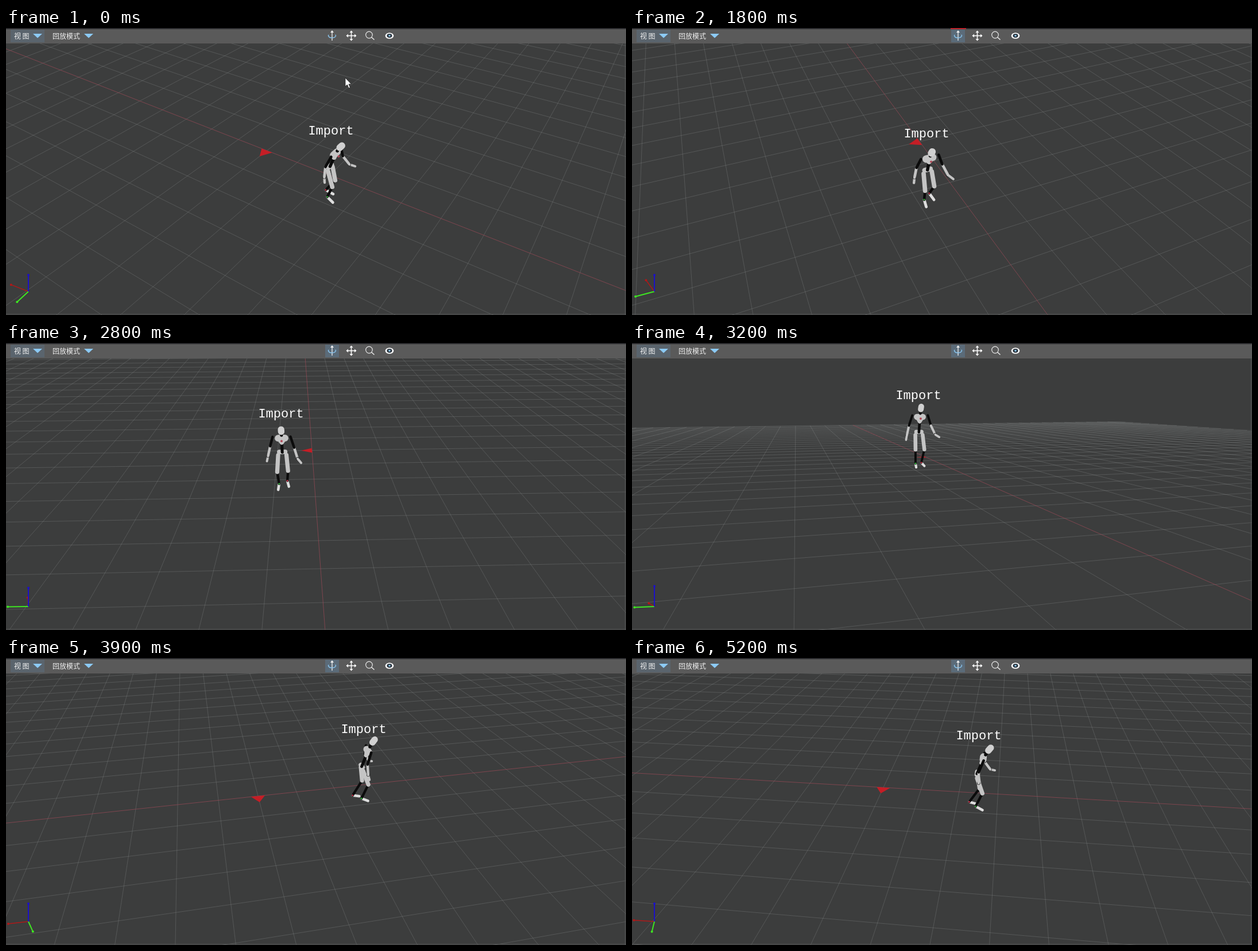
Write an HTML page with a canvas that moves like this. It is 1080x501 px and loops after 5600 ms.

```html
<!DOCTYPE html>
<html lang="zh">
<head>
<meta charset="utf-8">
<style>
html, body { margin: 0; width: 100%; height: 100%; overflow: hidden; background: #3c3d3d; }
canvas { display: block; }
</style>
</head>
<body>
<canvas id="view" width="1080" height="501"></canvas>
<script>
const ctx = document.getElementById('view').getContext('2d');
const LOOP = 5600, STEP = 100;
const FOCAL = 900, CX = 540, CY = 250, NEAR = 0.3, EXTENT = 22;
const LIGHT = '#c4c4c4', DARK = '#0b0b0b', RED = '#c41e26', BLUE = '#8ccaf5';

// time, yaw, pitch, screen x and y of the world origin, depth of the origin
const CAMERA = [
  [0, -56.9, 37, 454.5, 214, 14],
  [1050, -56.9, 37, 454.5, 214, 14],
  [1300, -56.7, 36.2, 454.5, 214, 14],
  [2100, -4.2, 37.2, 529, 189, 14.4],
  [2400, -2.2, 37, 531, 188.5, 14.5],
  [2500, -2.2, 37, 531, 188.5, 14.5],
  [2800, -1.95, 25.7, 533, 187.5, 15.1],
  [3200, -15.6, 9.5, 511, 199, 16.5],
  [3900, -102.6, 30, 439, 241, 13.2],
  [4800, -83.1, 29.9, 438, 226, 13.6],
  [5600, -83.1, 29.9, 438, 226, 13.6]
];

const ROOT = [2.48, -0.78, 0];
// joints: forward, sideways, up
const J = {
  pelvis: [0, 0, 0.95], chest: [0.12, 0, 1.3], neck: [0.18, 0, 1.45],
  headLow: [0.24, 0, 1.56], headTop: [0.29, 0, 1.63],
  shR: [0.15, -0.21, 1.4], elR: [0.05, -0.28, 1.13], wrR: [0.06, -0.34, 0.88], haR: [0.09, -0.37, 0.76],
  shL: [0.15, 0.21, 1.4], elL: [0.16, 0.29, 1.13], wrL: [0.3, 0.37, 0.9], haL: [0.41, 0.45, 0.84],
  hipR: [0.01, -0.1, 0.88], knR: [0.15, -0.13, 0.5], anR: [0, -0.1, 0.11], toR: [0.17, -0.12, 0.03],
  hipL: [0.01, 0.1, 0.88], knL: [0.07, 0.13, 0.49], anL: [-0.17, 0.1, 0.11], toL: [0.02, 0.14, 0.04],
  bustR: [0.13, -0.08, 1.36], bustL: [0.13, 0.08, 1.36], ribs: [0.1, 0, 1.24],
  seatR: [0, -0.07, 0.96], seatL: [0, 0.07, 0.96]
};
const BONES = [
  ['pelvis', 'chest', 0.07, DARK], ['neck', 'headLow', 0.07, DARK], ['headLow', 'headTop', 0.15, '#d0d0d0'],
  ['bustR', 'bustL', 0.16, LIGHT], ['bustR', 'ribs', 0.1, LIGHT], ['bustL', 'ribs', 0.1, LIGHT],
  ['seatR', 'seatL', 0.11, LIGHT],
  ...['R', 'L'].flatMap(s => [
    ['sh' + s, 'el' + s, 0.06, DARK], ['el' + s, 'wr' + s, 0.06, LIGHT], ['wr' + s, 'ha' + s, 0.055, LIGHT],
    ['wr' + s, 'wr' + s, 0.075, DARK], ['hip' + s, 'kn' + s, 0.1, LIGHT],
    ['kn' + s, 'an' + s, 0.06, DARK], ['an' + s, 'to' + s, 0.065, '#dedede']
  ])
];

const mix = (a, b, k) => a + (b - a) * k;

function cameraAt(t) {
  let i = 0;
  while (i < CAMERA.length - 2 && CAMERA[i + 1][0] <= t) i++;
  const a = CAMERA[i], b = CAMERA[i + 1];
  const k = (t - a[0]) / (b[0] - a[0]);
  const [, yaw, pitch, ox, oy, oz] = a.map((v, n) => mix(v, b[n], k));
  const y = yaw * Math.PI / 180, p = pitch * Math.PI / 180;
  return {
    sy: Math.sin(y), cy: Math.cos(y), sp: Math.sin(p), cp: Math.cos(p),
    x: (ox - CX) * oz / FOCAL, y: (oy - CY) * oz / FOCAL, z: oz
  };
}

function toCamera(c, [x, y, z]) {
  const right = -x * c.sy + y * c.cy, ahead = -x * c.cy - y * c.sy;
  return [c.x + right, c.y - ahead * c.sp - z * c.cp, c.z + ahead * c.cp - z * c.sp];
}
const toScreen = ([x, y, z]) => [CX + x * FOCAL / z, CY + y * FOCAL / z];
const project = (c, p) => toScreen(toCamera(c, p));

function line(color, width, ...pts) {
  ctx.strokeStyle = color;
  ctx.lineWidth = width;
  ctx.beginPath();
  pts.forEach(p => ctx.lineTo(...p));
  ctx.stroke();
}
function poly(color, ...pts) {
  ctx.fillStyle = color;
  ctx.beginPath();
  pts.forEach(p => ctx.lineTo(...p));
  ctx.fill();
}
function rect(color, x, y, w, h) {
  ctx.fillStyle = color;
  ctx.fillRect(x, y, w, h);
}
function dot(color, x, y, rx, ry = rx) {
  ctx.fillStyle = color;
  ctx.beginPath();
  ctx.ellipse(x, y, rx, ry, 0, 0, 7);
  ctx.fill();
}

function groundLine(c, p, q, color) {
  let a = toCamera(c, p), b = toCamera(c, q);
  if (a[2] < NEAR && b[2] < NEAR) return;
  if (a[2] > b[2]) [a, b] = [b, a];
  if (a[2] < NEAR) {
    const k = (NEAR - a[2]) / (b[2] - a[2]);
    a = a.map((v, i) => mix(v, b[i], k));
  }
  line(color, 1, toScreen(a), toScreen(b));
}

function drawGround(c) {
  const grey = 'rgba(160,163,162,0.25)';
  for (let i = -EXTENT; i <= EXTENT; i++) {
    groundLine(c, [i, -EXTENT, 0], [i, EXTENT, 0], grey);
    if (i) groundLine(c, [-EXTENT, i, 0], [EXTENT, i, 0], grey);
  }
  groundLine(c, [-EXTENT, 0, 0], [EXTENT, 0, 0], 'rgba(160,75,88,0.65)');
  poly(RED, ...[[-0.18, 0, 0], [0.18, 0, 0], [0, -0.32, 0]].map(p => project(c, p)));
}

function drawFigure(c) {
  const at = p => toCamera(c, p.map((v, i) => v + ROOT[i]));
  ctx.lineCap = 'round';
  BONES.map(([a, b, w, color]) => {
    const p = at(J[a]), q = at(J[b]);
    return { p, q, w, color, z: (p[2] + q[2]) / 2 };
  }).sort((a, b) => b.z - a.z).forEach(({ p, q, w, color, z }) => {
    const s = toScreen(p), e = toScreen(q);
    line(color, w * FOCAL / z, s, [e[0] + 0.01, e[1]]);
  });
  ctx.lineCap = 'butt';
  const mark = (color, p, r) => dot(color, ...toScreen(at(p)), r);
  if (c.cy > 0.3) mark('#b04a58', [0.22, 0, 1.32], 2);
  mark('#c8324a', J.anL, 1.4);
  mark('#35b83c', J.anR, 1.4);

  const [x, y] = toScreen(at([0, 0, 1.95]));
  ctx.font = '22px "Liberation Mono", "Noto Sans Mono", monospace';
  ctx.textAlign = 'center';
  ctx.fillStyle = '#fff';
  ctx.fillText('Import', Math.round(x), Math.round(y + 9));
}

function drawAxes(c) {
  const L = 36, x = 39, y = 460;
  const axis = (color, dx, dy, thick) => {
    const e = [x + dx * L, y + dy * L];
    line(color, thick, [x, y], e);
    dot(color, ...e, 2);
  };
  axis('#b01818', c.sy, -c.cy * c.sp, 1.5);
  axis('#3ee622', -c.cy, -c.sy * c.sp, 2);
  axis('#1c10c8', 0, -c.cp, 2);
}

function drawOrbitIcon(t) {
  const x = 568, y = 13.5;
  if (t >= 800) rect('#5b6b79', 556, 3, 24, 22);
  line('#f2f2f2', 1.3, [x, 6], [x, 22]);
  poly('#f2f2f2', [x - 3, 8], [x + 3, 8], [x, 4]);
  ctx.strokeStyle = BLUE;
  ctx.lineWidth = 1.3;
  ctx.beginPath();
  ctx.ellipse(x, y, 6.5, 3.5, 0, -0.5, 3.6);
  ctx.stroke();
  if (t >= 1100 && t < 1700) {
    dot('#e01822', x, y - 1, 6, 5);
    poly('#e01822', [x - 4, y + 2], [x + 4, y + 2], [x, y + 8]);
  }
  if (t >= 1700 && t < 2300) rect('#b42028', 555, 0, 27, 2);
}

function drawToolbar(t) {
  rect('#5a5a5a', 0, 0, 1080, 27);
  rect('#29292c', 0, 0, 1080, 2);
  rect('#5a646d', 8, 3, 59, 22);
  ctx.font = '12px "Noto Sans CJK SC", "Noto Sans CJK", sans-serif';
  ctx.textAlign = 'left';
  ctx.fillStyle = '#f0f0f0';
  ctx.fillText('视', 14, 19);
  ctx.fillText('图', 28.5, 19);
  ctx.fillText('回放模式', 81, 19);
  for (const x of [55, 144]) poly(BLUE, [x - 8, 10], [x + 8, 10], [x, 17.5]);

  drawOrbitIcon(t);

  const mx = 601.5, my = 13.5, white = '#fff';
  line(white, 1.5, [mx - 8, my], [mx + 8, my]);
  line(white, 1.5, [mx, my - 8], [mx, my + 8]);
  for (const [dx, dy] of [[1, 0], [-1, 0], [0, 1], [0, -1]]) {
    const tip = [mx + dx * 9, my + dy * 9], bx = mx + dx * 5.5, by = my + dy * 5.5;
    poly(white, tip, [bx + dy * 3, by + dx * 3], [bx - dy * 3, by - dx * 3]);
  }

  ctx.strokeStyle = '#e8e8e8';
  ctx.lineWidth = 1.2;
  ctx.beginPath();
  ctx.arc(632.5, 12, 5.8, 0, 7);
  ctx.stroke();
  line('#e8e8e8', 1.6, [636.5, 16], [641.5, 20.5]);

  dot(white, 668, 13.5, 7.3, 5.3);
  dot('#2c3640', 668, 13.5, 4.6, 3.4);
  dot(BLUE, 668, 13.5, 1.7, 1.4);
}

function drawCursor(t) {
  if (t >= 1100) return;
  const k = Math.min(1, Math.max(0, (t - 400) / 500));
  const x = mix(591, 568, k), y = mix(87, 12, k);
  const shape = [[0, 0], [0, 15], [3.5, 12], [6, 18], [8.5, 17], [6, 11], [10.5, 11], [0, 0]]
    .map(([a, b]) => [x + a, y + b]);
  poly('#fff', ...shape);
  line('#222', 0.8, ...shape);
}

function draw(now) {
  const t = Math.floor((now % LOOP) / STEP) * STEP;
  const c = cameraAt(t);
  rect('#3c3d3d', 0, 0, 1080, 501);
  drawGround(c);
  drawFigure(c);
  drawAxes(c);
  rect('#535454', 1078, 27, 1, 474);
  rect('#535454', 0, 499, 1080, 1);
  drawToolbar(t);
  drawCursor(t);
}

const start = performance.now();
function tick() {
  draw(performance.now() - start);
  requestAnimationFrame(tick);
}
tick();
</script>
</body>
</html>
```
